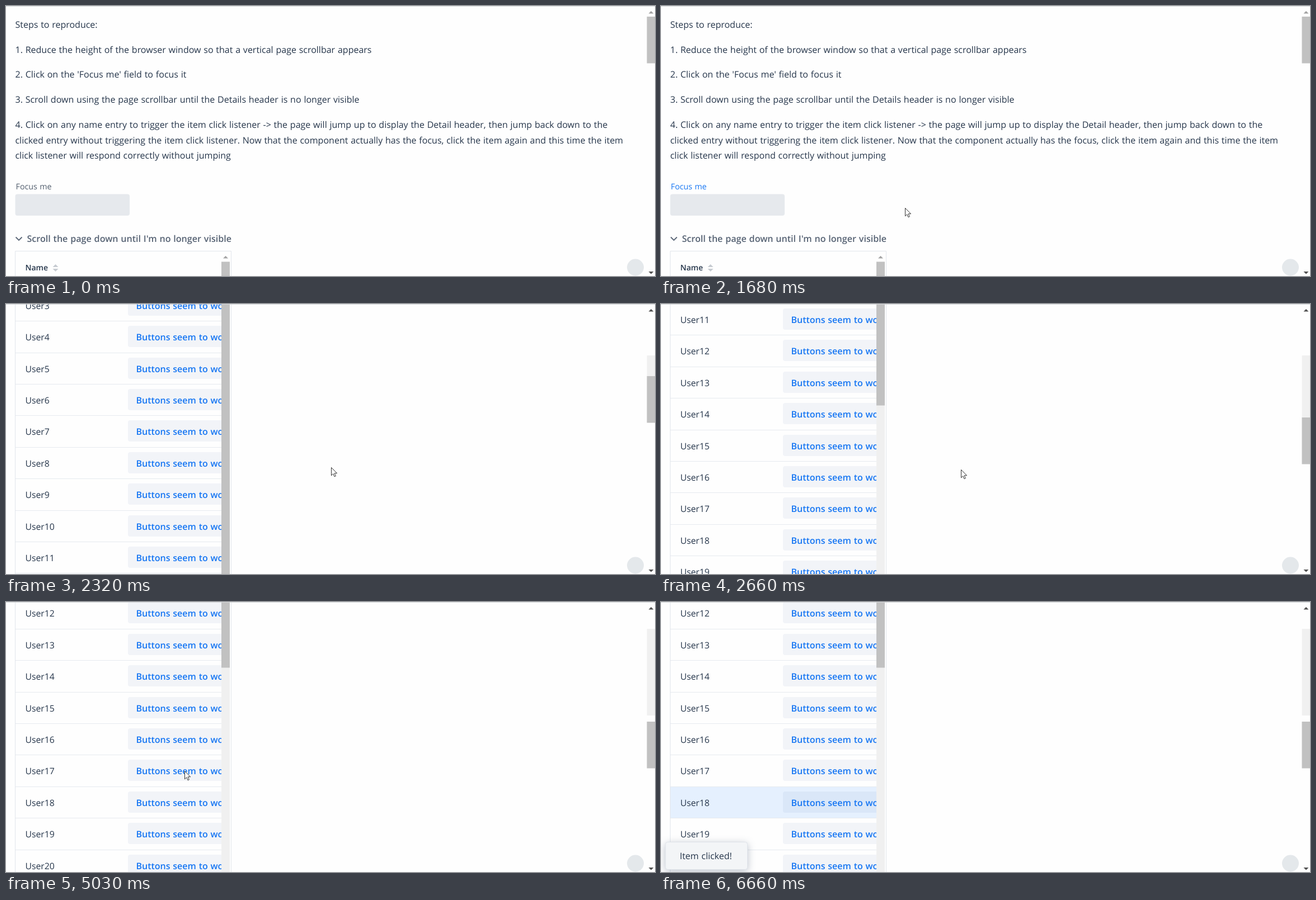
Recreate the animation shown at these times as an HTML page. Size 1160x483 px, loop 7.25 s.

```html
<!DOCTYPE html>
<html lang="en">
<head>
<meta charset="utf-8">
<title>Focus jump</title>
<style>
html, body { margin: 0; height: 100%; overflow: hidden; background: #fefefe; }
svg { display: block; }
text {
  font: 16px "Open Sans", "Noto Sans", sans-serif;
  fill: #26364b; word-spacing: .64px;
  text-rendering: geometricPrecision; white-space: pre;
}
.bold { font-weight: 600; }
.small { font-size: 14px; }
.user { font-size: 15.75px; }
.link { fill: #1676f3; }
#toast rect { filter: drop-shadow(0 3px 7px rgba(35, 55, 90, .3)); }
</style>
</head>
<body>
<svg width="1160" height="483" viewBox="0 0 1160 483">
  <defs><clipPath id="cells"><path d="M17 439H385V2000H17Z"/></clipPath></defs>
  <g id="page">
    <g id="steps"></g>
    <text id="label" x="17.5" y="328" style="font-size:14.3px">Focus me</text>
    <rect x="16.5" y="336.5" width="204.5" height="38.5" rx="4" fill="#e6e9ed"/>
    <path id="caret" d="M27.5 344V367" stroke="#4a5058"/>
    <path d="M17.5 413.5L23 419L28.5 413.5" fill="none" stroke="#5a6676" stroke-width="1.8"/>
    <text class="bold" x="37.5" y="422" style="fill:#566273; font-size:16.1px">Scroll the page down until I'm no longer visible</text>
    <g id="rows" clip-path="url(#cells)"></g>
    <text class="bold small" x="34.5" y="473">Name</text>
    <path d="M83.5 467L88.5 462L93.5 467ZM83.5 470L88.5 475L93.5 470Z" fill="#c6cbd1"/>
    <path d="M385 1245H400V2000H385Z" fill="#f0f0f0"/>
    <path d="M385 457.5H400V1245.5H385Z" fill="#c1c1c1"/>
    <path d="M388 451.5L392.5 447L397 451.5Z" fill="#a3a3a3"/>
    <path d="M16.5 2000V438.5H402.5V2000" fill="none" stroke="#e2e6ec"/>
  </g>
  <rect id="track" x="1145.5" width="14.5" fill="#f0f0f0"/>
  <rect id="thumb" x="1145.5" width="14.5" height="83.5" fill="#c1c1c1"/>
  <path id="up" d="M1148.5 13.5L1153 9L1157.5 13.5Z"/>
  <path d="M1148.5 475L1153 479.5L1157.5 475Z" fill="#505050"/>
  <path d="M0 .5H1160" stroke="#d6d8da"/>
  <circle cx="1125" cy="467.5" r="15" fill="#e4e8eb"/>
  <g id="toast">
    <rect x="8" y="429.5" width="146.5" height="49" rx="4" fill="#f3f5f7" stroke="#dfe3e9"/>
    <text x="33.5" y="460">Item clicked!</text>
  </g>
  <g id="mouse">
    <circle id="press" r="12.5" cy="-.5" fill="#ffff3c" opacity=".7"/>
    <path id="arrow" d="M.5 .5V14.8L3.8 11.7L6 16.8L8.3 15.8L6.1 10.8H10.6Z" fill="#fff" stroke="#333"/>
    <path id="beam" d="M-4 -7.5H-1L.5 -6.5L2 -7.5H5M.5 -6.5V7.5M-4 8.5H-1L.5 7.5L2 8.5H5" fill="none" stroke="#222" stroke-width="1.3"/>
  </g>
</svg>
<script>
const LOOP = 7250, ROW = 56.4, ROWS_TOP = 499, NOTCH = 106.4;
const $ = id => document.getElementById(id);
const show = (id, on) => $(id).setAttribute('visibility', on ? 'visible' : 'hidden');
const move = (id, x, y) => $(id).setAttribute('transform', `translate(${x} ${y})`);

const steps = [
  [39, 'Steps to reproduce:'],
  [84, '1. Reduce the height of the browser window so that a vertical page scrollbar appears'],
  [128, "2. Click on the 'Focus me' field to focus it"],
  [173, '3. Scroll down using the page scrollbar until the Details header is no longer visible'],
  [218, '4. Click on any name entry to trigger the item click listener -> the page will jump up to display the Detail header, then jump back down to the'],
  [246, 'clicked entry without triggering the item click listener. Now that the component actually has the focus, click the item again and this time the item'],
  [273, 'click listener will respond correctly without jumping']
];
$('steps').innerHTML = steps.map(([y, s]) =>
  `<text x="16.5" y="${y}">${s.replace('>', '&gt;')}</text>`).join('');

let rows = `<path d="M17 ${ROWS_TOP}.5H385" stroke="#e6eaef"/>`;
for (let i = 0; i < 22; i++) {
  const y = Math.round(ROWS_TOP + i * ROW), base = y + 35;
  rows += `<rect id="row${i + 1}" x="17" y="${y + 1}" width="368" height="56" fill="none"/>
    <path d="M17 ${Math.round(ROWS_TOP + (i + 1) * ROW) + .5}H385" stroke="#e6eaef"/>
    <rect x="218" y="${y + 9}" width="200" height="38" rx="4" fill="#1a4580" opacity=".05"/>
    <text class="user" x="34.5" y="${base}">User${i + 1}</text>
    <text class="bold link" x="232.5" y="${base}">Buttons seem to work</text>`;
}
$('rows').innerHTML = rows;

// Mouse way points: time, x, y
const path = [
  [70, 1002, 470], [720, 104, 347], [1280, 104, 347], [1530, 343, 402],
  [1900, 598, 290], [2140, 598, 290], [2660, 536, 296], [2970, 130, 320],
  [3120, 130, 320], [3500, 96, 314], [4580, 96, 314], [4800, 762, 436],
  [5030, 319, 302], [5300, 150, 313], [5600, 108, 348], [6450, 108, 348],
  [6660, 1140, 500]
];
const wheel = [1960, 2050, 2140, 2200, 2260, 2320, 2390, 2450, 2530, 2600];

function mouseAt(t) {
  const i = path.findIndex(p => p[0] > t);
  if (i < 1) return path[0].slice(1);
  const [t0, x0, y0] = path[i - 1], [t1, x1, y1] = path[i];
  const u = (t - t0) / (t1 - t0), k = u * u * (3 - 2 * u);
  return [x0 + (x1 - x0) * k, y0 + (y1 - y0) * k];
}

function scrollAt(t) {
  if (t >= 4050) return 1128;
  if (t >= 3580) return 171;
  return Math.round(wheel.filter(w => w <= t).length * NOTCH);
}

function draw(t) {
  const within = (a, b) => t >= a && t < b;
  const scroll = scrollAt(t), thumb = Math.round(19 + scroll / 5.785);
  move('page', 0, -scroll);
  $('thumb').setAttribute('y', thumb);
  $('up').setAttribute('fill', scroll ? '#505050' : '#a0a0a0');

  const top = t < 3580 ? 92 : 48, bottom = t < 3580 ? Math.min(203, thumb) : 203;
  $('track').setAttribute('y', top);
  $('track').setAttribute('height', Math.max(0, bottom - top));

  const focused = within(880, 3580);
  $('label').style.fill = focused ? '#1676f3' : within(650, 880) ? '#26364b' : '#525e6e';
  show('caret', focused && (t - 880) % 1000 < 500);
  $('row18').setAttribute('fill', t >= 5810 ? '#e5f0fe' : 'none');

  const k = Math.min(1, Math.max(0, (t - 5960) / 240));
  $('toast').setAttribute('opacity', k);
  move('toast', 0, 49 * (1 - k) ** 2);

  const [x, y] = mouseAt(t), on = within(70, 6660);
  const overField = !scroll && x > 16 && x < 221 && y > 336 && y < 375;
  move('mouse', Math.round(x), Math.round(y));
  show('arrow', on && !overField);
  show('beam', on && overField);
  show('press', within(880, 1090) || within(3520, 4050) || within(5620, 5810));
}

const start = performance.now();
function tick() {
  draw((performance.now() - start) % LOOP);
  requestAnimationFrame(tick);
}
tick();
</script>
</body>
</html>
```
